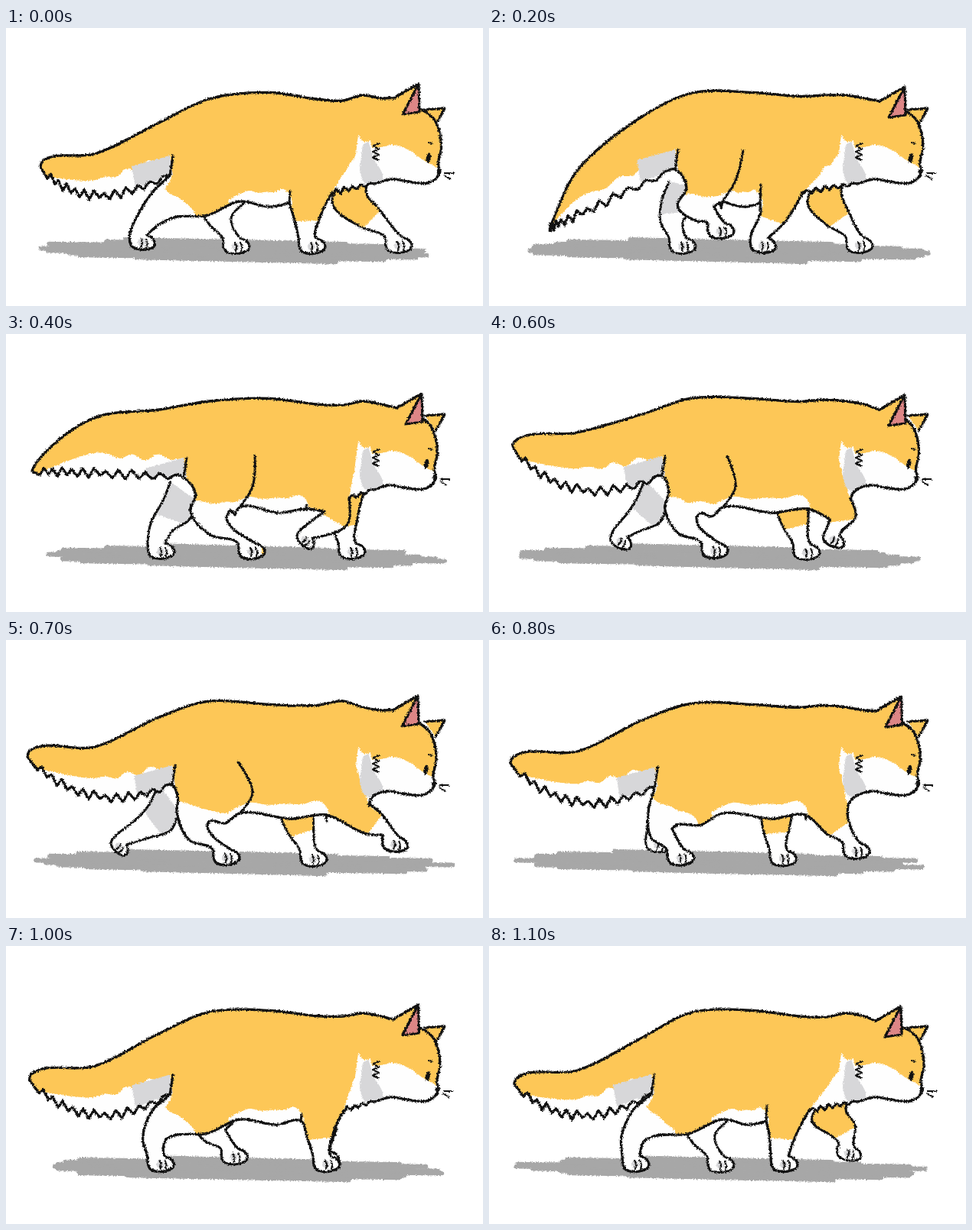
Recreate the animation shown at these times as an HTML page with a canvas. Size 623 by 364 pixels, loop 1.2 s.

```html
<!DOCTYPE html>
<html lang="en">
<head>
<meta charset="utf-8">
<title>Walking animal</title>
<style>
html, body { margin: 0; width: 100%; height: 100%; overflow: hidden; background: #fff; }
canvas { display: block; filter: url(#rough); }
svg { position: absolute; width: 0; height: 0; }
</style>
</head>
<body>
<canvas id="stage" width="623" height="364"></canvas>
<svg><filter id="rough" x="0" y="0" width="1" height="1" color-interpolation-filters="sRGB">
  <feTurbulence type="fractalNoise" baseFrequency=".55" numOctaves="2" seed="4"/>
  <feDisplacementMap in="SourceGraphic" scale="4" xChannelSelector="R" yChannelSelector="G"/>
</filter></svg>
<script>
const ORANGE = '#fdc757', WHITE = '#fefefe', GREY = '#d7d7d9', PINK = '#dd8686', INK = '#111', SHADE = '#a7a7a7';
const STEPS = 12, GROUND = 285;
const ctx = document.getElementById('stage').getContext('2d');

// Key points of the walk at these steps of 100 ms; the rest follows from them.
const beats = [0, 2, 4, 6, 7, 9, 11];
const tracks = {
  tip: [[45, 182], [80, 261], [34, 180], [31, 148], [28, 153], [28, 170], [33, 181]],
  join: [[214, 193], [243, 185], [232, 188], [226, 186], [217, 190], [216, 195], [212, 194]],
  ear: [[539, 73], [543, 77], [543, 78], [543, 80], [538, 73], [539, 75], [538, 79]],
  tailTop: [165, 187, 110, 129, 140, 152, 163],
  tailLow: [219, 245, 182, 203, 204, 220, 222],
  rump: [124, 116, 99, 105, 101, 109, 120],
  loin: [93, 85, 88, 84, 80, 86, 87],
  withers: [95, 88, 93, 86, 80, 91, 93]
};
const legs = {
  farHind: {
    hip: [284, 248, 222, 208, 202, 256, 284],
    paw: [[301, 286], [253, 286], [203, 285], [172, 272], [148, 271], [294, 266], [303, 287]]
  },
  farFront: {
    hip: [448, 438, 443, 398, 381, 375, 444],
    paw: [[513, 285], [484, 285], [452, 285], [415, 286], [402, 287], [367, 286], [470, 272]]
  },
  hind: {
    hip: [206, 274, 267, 253, 245, 209, 203],
    paw: [[178, 281], [303, 266], [321, 285], [295, 284], [288, 285], [213, 286], [192, 286]]
  },
  front: {
    hip: [398, 382, 420, 444, 446, 436, 390],
    paw: [[400, 286], [358, 285], [391, 270], [450, 270], [508, 268], [452, 286], [386, 286]]
  }
};

const lerp = (a, b, k) => Array.isArray(a) ? a.map((v, i) => lerp(v, b[i], k)) : a + (b - a) * k;
const add = ([x, y], dx, dy) => [x + dx, y + dy];
const unit = ([ax, ay], [bx, by]) => {
  const d = Math.hypot(bx - ax, by - ay) || 1;
  return [(bx - ax) / d, (by - ay) / d];
};
const noise = n => {
  const v = Math.sin(n * 12.9898) * 43758.5453;
  return v - Math.floor(v) - .5;
};

function sample(track, step) {
  const i = beats.findLastIndex(b => b <= step);
  const end = beats[i + 1] ?? STEPS;
  return lerp(track[i], track[(i + 1) % beats.length], (step - beats[i]) / (end - beats[i]));
}

// Uneven edge from a to b
function ragged(a, b, n, amp) {
  return Array.from({ length: n + 1 }, (_, i) =>
    add(lerp(a, b, i / n), 0, i % n ? noise(i + a[0]) * amp * 2 : 0));
}

// Tufts of fur along the curve at(0..1)
function tufts(at, n, amp) {
  const pts = [];
  for (let i = 0; i < n; i++) {
    const size = amp * (1 + noise(i + 7));
    pts.push(add(at((i + .55) / n), 0, -size * .6), add(at((i + 1) / n), 0, size * .6));
  }
  return pts;
}

// Smooth curve through the points, keeping sharp turns as corners
function curve(pts) {
  const path = new Path2D();
  const tangents = pts.map((p, i) => {
    if (!i || i === pts.length - 1) return [0, 0];
    const u = unit(pts[i - 1], p), v = unit(p, pts[i + 1]);
    return u[0] * v[0] + u[1] * v[1] < .2 ? [0, 0] : unit([0, 0], add(u, ...v));
  });
  path.moveTo(...pts[0]);
  for (let i = 1; i < pts.length; i++) {
    const [a, b] = [pts[i - 1], pts[i]], [s, t] = [tangents[i - 1], tangents[i]];
    const h = Math.hypot(b[0] - a[0], b[1] - a[1]) * .32;
    path.bezierCurveTo(a[0] + s[0] * h, a[1] + s[1] * h, b[0] - t[0] * h, b[1] - t[1] * h, ...b);
  }
  return path;
}

function fill(pts, color) {
  ctx.fillStyle = color;
  ctx.fill(curve(pts));
}

function line(pts, width = 3) {
  ctx.lineWidth = width;
  ctx.stroke(curve(pts));
}

function oval(x, y, rx, ry, color, turn = 0) {
  ctx.fillStyle = color;
  ctx.beginPath();
  ctx.ellipse(x, y, rx, ry, turn, 0, 7);
  ctx.fill();
}

// Filled shape with patches kept inside it
function shape(pts, color, patches) {
  fill(pts, color);
  ctx.save();
  ctx.clip(curve(pts));
  for (const [patch, tint] of patches) fill(patch, tint);
  ctx.restore();
}

// Leg outline from hip and paw; knee bend, hip tilt and paw droop follow from the stride
function makeLeg(name, step) {
  const hind = /hind/i.test(name);
  const hip = [sample(legs[name].hip, step), hind ? 231 : 222];
  const foot = sample(legs[name].paw, step);
  const stride = foot[0] - hip[0], lift = Math.max(0, GROUND - foot[1]);
  const tilt = hind ? (266 - hip[0]) * .28 : -7;
  const width = hind ? 26 - tilt * .7 : name === 'front' ? 28 : 22;
  const bend = hind ? lift * .4 - 8 - stride * .1 : Math.max(0, lift * 1.3 - stride * .25) - 3;
  const droop = hind ? Math.max(0, -stride) * lift * .0011 : Math.max(0, bend) * .035;
  const size = 1 - droop * .25, cos = Math.cos(droop) * size, sin = Math.sin(droop) * size;
  const paw = (x, y) => add(foot, x * cos - y * sin, x * sin + y * cos);

  const dir = unit(hip, foot), side = [dir[1], -dir[0]];
  const knee = add(lerp(hip, paw(-6, -11), .5), bend, 0);
  const across = (p, w, along = 0) => add(p, side[0] * w + dir[0] * along, side[1] * w + dir[1] * along);
  const half = hind ? 15 : 17;
  const outline = [
    add(hip, width, tilt), across(knee, half), paw(5, -11),
    paw(12, -8), paw(17, 0), paw(13, 6), paw(-13, 7), paw(-17, 0),
    paw(-18, -11), across(knee, -half), add(hip, -width, -tilt)
  ];
  const cut = (p, along) => [across(p, -60), across(p, 60), across(p, 60, along), across(p, -60, along)];
  return {
    hip, paw, outline, frontTop: outline[0], backTop: outline.at(-1),
    upper: cut(lerp(hip, knee, .5), -90), sock: cut(across(knee, 0, 4), 90)
  };
}

function drawToes({ paw }) {
  oval(...paw(-1, 0), 5, 5, GREY);
  for (const x of [0, 7]) line([paw(x - 2, -5), paw(x, 0), paw(x - 1, 6)], 2.2);
}

function drawFarLeg(leg, color, patches) {
  const pts = [add(leg.frontTop, 10, -25), ...leg.outline, add(leg.backTop, 10, -25)];
  shape(pts, color, patches);
  line(pts);
  drawToes(leg);
}

// Layered brush strokes, widest in the middle
function drawShadow(step) {
  ctx.strokeStyle = SHADE;
  for (let i = 0; i < 9; i++) {
    const u = i / 4 - 1, y = 280 + i * 2.9, w = 255 * Math.sqrt(1 - u * u * .75);
    const x = 306 - w + noise(step * 9 + i) * 45, end = 306 + w + noise(step * 5 + i + 80) * 45;
    line([[x, y - 3], [306, y], [end, y + 3]], 6);
  }
  ctx.strokeStyle = INK;
}

function draw(step) {
  ctx.clearRect(0, 0, 623, 364);
  ctx.lineCap = ctx.lineJoin = 'round';
  const p = {};
  for (const key in tracks) p[key] = sample(tracks[key], step);
  const { tip, join, ear } = p;
  const [farHind, farFront, hind, front] = Object.keys(legs).map(name => makeLeg(name, step));
  const sway = 3.5 * Math.cos(step / STEPS * 2 * Math.PI);

  drawShadow(step);
  drawFarLeg(farHind, WHITE, farHind.hip[0] < 250 ? [[farHind.upper, GREY]] : []);
  drawFarLeg(farFront, ORANGE, [[farFront.sock, WHITE]]);
  const farEar = [[547, 107], [573, 105], [561, 127]];
  fill(farEar, ORANGE);
  line(farEar);

  // Underside of the tail passes through its low point
  const low = [115, p.tailLow];
  const bow = lerp(lerp(join, tip, .5), low, 2);
  const under = t => lerp(lerp(join, bow, t), lerp(bow, tip, t), t);

  const base = add(ear, -33, 19), root = add(ear, 1, 37), lobe = add(ear, -21, 40);
  const back = [
    tip, add(tip, 3, -8), [115, p.tailTop], [200, p.rump], [265, p.loin], [345, 84.5],
    [405, (91 + p.withers) / 2], [440, p.withers], [466, 88], [490, 92], base
  ];
  const face = [
    [543, 109], [556, 120], [563, 137], [565, 157], [561, 178],
    [563, 188], [559, 196], [547, 203], [522, 201], [500, 198]
  ].map(q => add(q, sway, 0));
  const throat = [480, 204], groin = [305, 227];
  const chest = tufts(t => lerp(throat, front.frontTop, t), Math.ceil((480 - front.frontTop[0]) / 12), 4);
  const rear = add(lerp(hind.backTop, join, .5), Math.max(0, hind.hip[0] - 230) * .3, 0);
  const body = [
    ...back, ...face, throat, ...chest, ...front.outline,
    add(lerp(front.backTop, groin, .4), 0, 6), groin,
    add(lerp(groin, hind.frontTop, .5), 0, 8), ...hind.outline, rear, join,
    ...tufts(t => under(t * .92), 12, 7), tip
  ];

  const edge = [115, lerp(p.tailTop, p.tailLow, .64)], tailEnd = under(.9), hem = add(join, 0, -26);
  const bib = lerp(front.frontTop, [457, 165], .5);
  const flank = front.backTop[0];
  shape(body, ORANGE, [
    [[tailEnd, ...ragged(edge, hem, 7, 6), add(join, 0, 8), add(low, 0, 30), add(tailEnd, 0, 20)], WHITE],
    [[add(join, -50, -12), hem, add(join, 4, 0), add(join, -45, 16)], GREY],
    [[...ragged(add(hind.backTop, 4, -14), add(hind.frontTop, 25, -8), 5, 3),
      add(hind.frontTop, 40, 80), add(hind.backTop, -60, 90), add(hind.backTop, -10, -6)], WHITE],
    [[[290, 226], ...ragged([318, 213], [flank - 8, 211], 4, 4), [flank + 3, 224], [flank, 250], [300, 250]], WHITE],
    [[[460, 140], [468, 149], [476, 147], [478, 157], [490, 156], [505, 153], [525, 159], [545, 173],
      [570, 189], [575, 212], [480, 222], front.frontTop, ...ragged(bib, [457, 165], 4, 4)], WHITE],
    [[[466, 152], [474, 149], [480, 170], [492, 197], [482, 206], [468, 203], [462, 185]], GREY]
  ]);
  ctx.save();
  ctx.clip(curve(front.outline));
  fill(front.sock, WHITE);
  ctx.restore();
  line(body, 3.3);
  drawToes(hind);
  drawToes(front);

  line([add(join, 4, -26), join]);
  line([add(front.backTop, 1, (front.hip[0] - 430) * .5), front.backTop]);
  if (hind.hip[0] > 240) line([[hind.hip[0] + 58, 160], [322, 200], groin]);
  line(Array.from({ length: 7 }, (_, i) => [i % 2 ? 479 : 487, 151 + i * 3.7]), 2.2);

  fill([base, ear, root, lobe], ORANGE);
  fill([ear, root, lobe], PINK);
  line([base, ear, root, lobe, ear], 3.2);

  const [nx, ny] = [562 + sway, 188];
  oval(550 + sway / 2, 170, 3, 6.5, INK, .2);
  oval(nx, ny, 3, 3.5, INK);
  line([[552, 150], [556, 151]], 2);
  line([[nx + 8, ny + 2], [nx + 19, ny + 2]], 1.8);
  line([[nx + 7, ny + 5], [nx + 15, ny + 10]], 1.8);
}

let shown = -1;
function tick() {
  const step = Math.floor(performance.now() / 100) % STEPS;
  if (step !== shown) draw(shown = step);
  requestAnimationFrame(tick);
}
tick();
</script>
</body>
</html>
```
